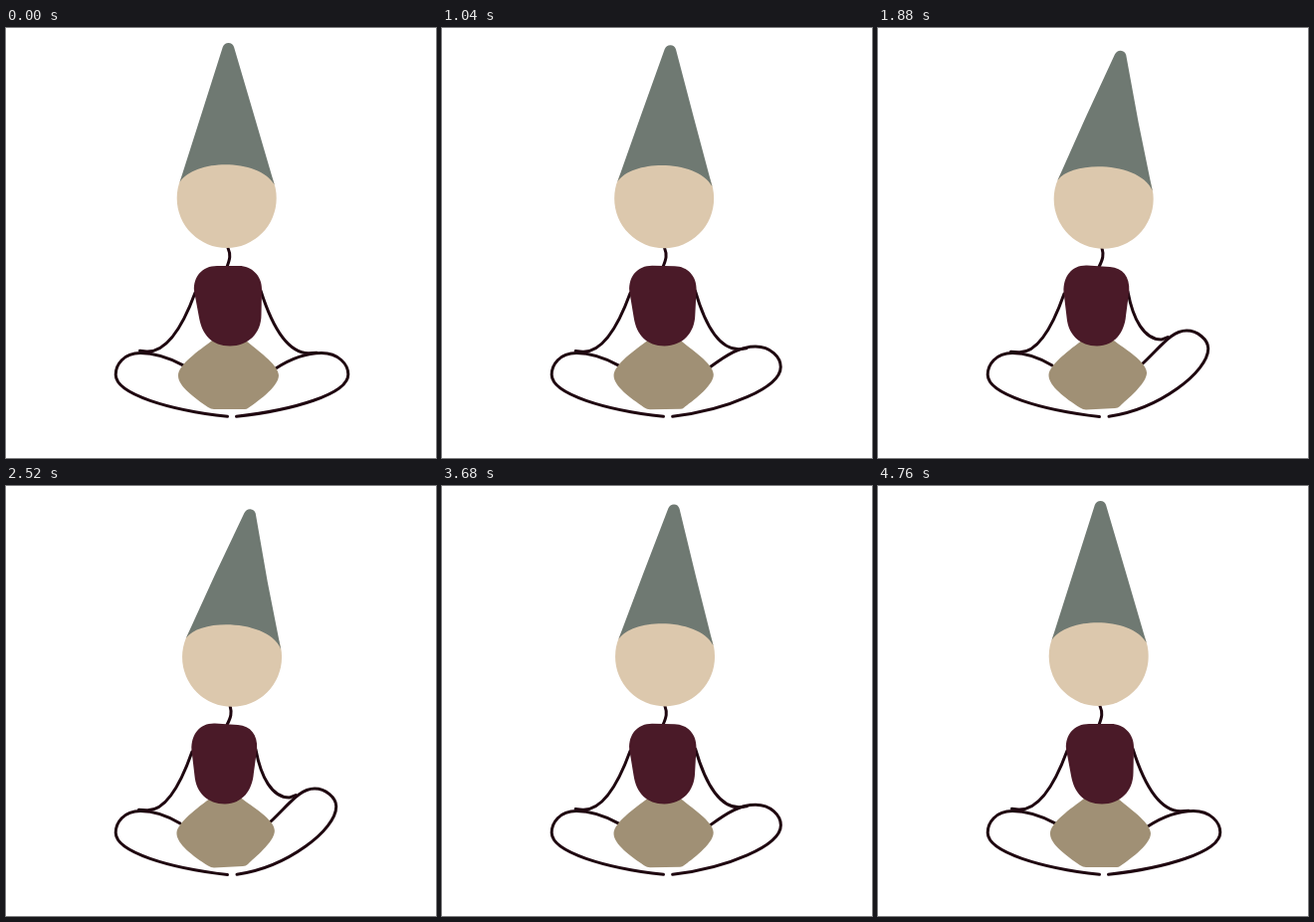
Write an HTML page that moves like this. It is 432 px wide and 432 px high and loops after 4800 ms.

```html
<!DOCTYPE html>
<html lang="en">
<head>
<meta charset="utf-8">
<title>Meditating figure</title>
<style>
  html, body { margin: 0; width: 100%; height: 100%; overflow: hidden; background: #fff; }
  svg { display: block; width: 100vw; height: 100vh; }
  .line { fill: none; stroke: #1f0710; stroke-width: 3; stroke-linecap: round; stroke-linejoin: round; }
</style>
</head>
<body>
<svg id="stage" viewBox="0 0 432 432"></svg>
<script>
const LOOP = 4800, REACH = 1.088;
const stage = document.getElementById('stage');

// CSS-style cubic-bezier easing
function bezier(x1, y1, x2, y2) {
  const at = (a, b, s) => 3 * a * s * (1 - s) ** 2 + 3 * b * s * s * (1 - s) + s ** 3;
  return x => {
    let lo = 0, hi = 1;
    for (let i = 0; i < 24; i++) {
      const mid = (lo + hi) / 2;
      if (at(x1, x2, mid) < x) lo = mid; else hi = mid;
    }
    return at(y1, y2, lo);
  };
}

const lean = bezier(.63, 0, .5, 1);
const settle = {
  head: bezier(.2, 0, .75, 1),
  torso: bezier(.25, .25, .6, 1),
  leg: bezier(.33, .55, .67, 1)
};

// Each part: settling curve, fill (none = outline), upright pose, leaning pose
const parts = [
  ['leg', '',
    'M178 338.8C160 329.5 148 326.6 135 326.6C118 326.6 110.2 338.5 110.2 348.3C110.2 368 165 384 222.5 390.3',
    'M175 339C160 329.7 148 326.4 135 326.4C118 326.4 110.2 338.5 110.2 348.3C110.2 368 165 384 222.5 390.5'],
  ['leg', '',
    'M271 342C288 331 302 326.5 317 326.5C334 326.5 343.8 338 343.8 348C343.8 368 288 384 231.5 390.3',
    'M266 337C285 319 295 304 310 304C321 304 331.7 313 331.7 322C331.7 345 283 383 232 390.3'],
  ['torso', '',
    'M190 266C176 304 160 326 141 325L134.5 324.2',
    'M187 267C174 304 159 327 141 325.7L133.5 325.2'],
  ['leg', '',
    'M256 264C269 305 285.5 326.6 304 326.7L312 326.3',
    'M251 265C256 292 267 313 284.5 313L291 310.5'],
  ['torso', '#a09075',
    'M207 314L241 314C250 322 274 338 274 349C274 361 250 377 243 382Q242 383 240 383L209 383Q206 383 203 381C190 372 173 360 173 349.5C173 338 194 324 207 314Z',
    'M206 313L237 314C247 322 270 335 270 346.5C270 357.5 249 374 243 380Q241 382 238 382L209 383.5Q206 383.5 203 381.5C188 372 171.5 359.5 171.5 349C171.5 338.5 193 323 206 313Z'],
  ['head', '',
    'M223 221C226 228 225 232 222 240',
    'M225 221C227 228 226 232 222 240'],
  ['torso', '#4a1a28',
    'M189 264C188 250 197 239 212 239L234 239C247 239 257 249 257 262L256.5 288C256.5 307 243 319.5 225 319.5C207 319.5 197 308 194 291Z',
    'M186.5 265C186 249 195 238 210 238.5L233 240C246 241 253 250 252.3 264L249 289C247.5 306 238 319 220 319.5C203 319.5 191 308 189.6 291Z'],
  ['head', '#dcc8ad',
    'M171.7 171a50 50 0 1 0 100 0a50 50 0 1 0 -100 0Z',
    'M176.7 171.8a50 50 0 1 0 100 0a50 50 0 1 0 -100 0Z'],
  ['head', '#6f7972',
    'M174.5 155Q196.2 87 217.8 19Q219.5 15 223.5 15Q227.5 15 229 19Q249.4 88 269.7 157.5C254 131 190 131 174.5 155Z',
    'M180.5 153Q208.2 89.7 238 26.5Q240 22.5 244 22.7Q248 23 249.3 27Q261 95 275.7 163.5C264 134.5 195 132 180.5 153Z']
].map(([group, fill, upright, leaning]) => {
  const path = stage.appendChild(document.createElementNS('http://www.w3.org/2000/svg', 'path'));
  if (fill) path.setAttribute('fill', fill);
  else path.setAttribute('class', 'line');
  return { path, group, upright, target: leaning.match(/-?[\d.]+/g) };
});

function blend({ upright, target }, amount) {
  let i = 0;
  return upright.replace(/-?[\d.]+/g, n => +n + (target[i++] - n) * amount);
}

function draw(now) {
  const phase = now % LOOP / LOOP * 2;
  for (const part of parts) {
    const amount = phase < 1 ? lean(phase) : 1 - settle[part.group](phase - 1);
    part.path.setAttribute('d', blend(part, amount * REACH));
  }
}

const start = performance.now();
function tick() {
  draw(performance.now() - start);
  requestAnimationFrame(tick);
}
tick();
</script>
</body>
</html>
```
